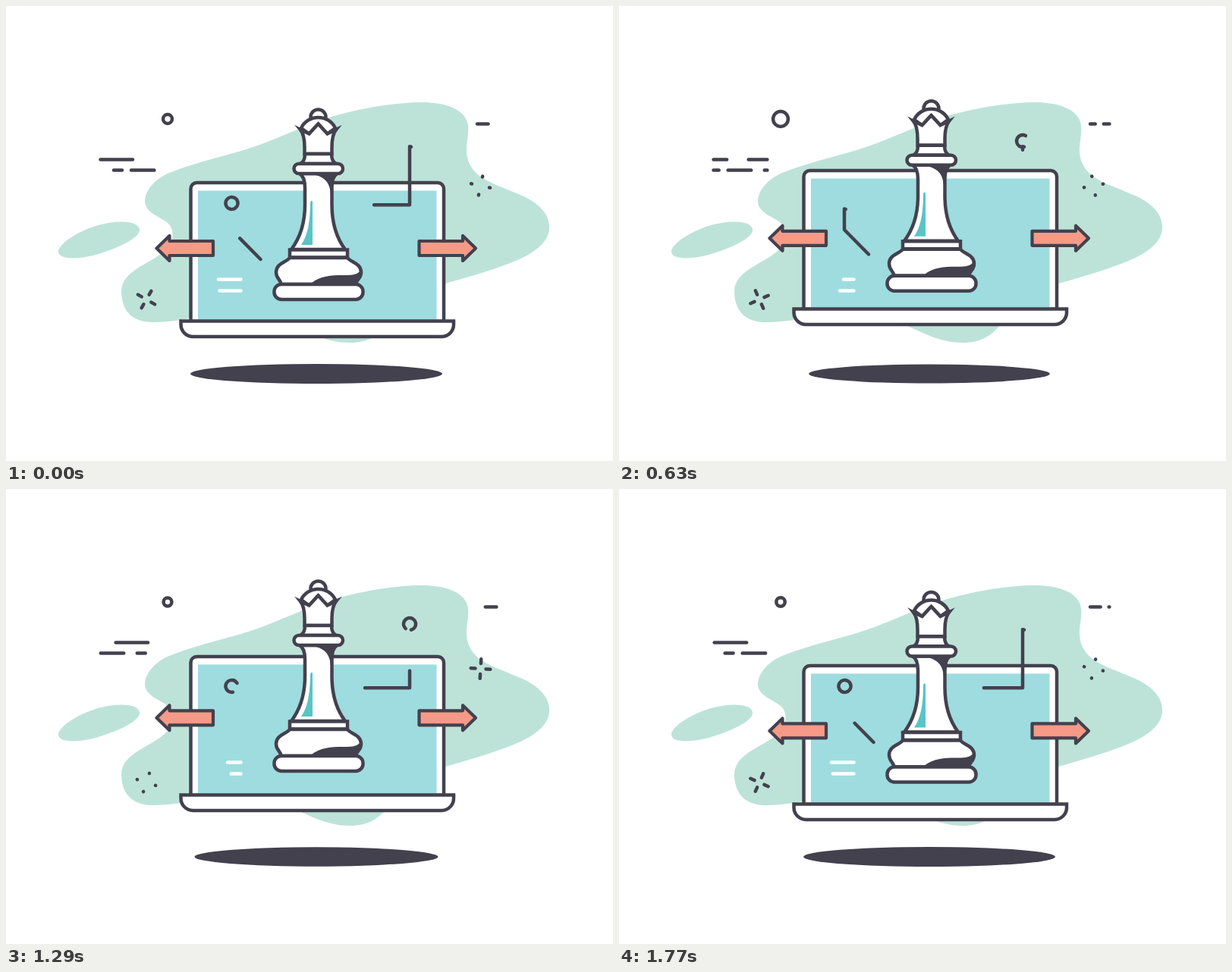
Write an HTML page that moves like this. It is 800 by 600 pixels and loops after 1800 ms.

```html
<!DOCTYPE html>
<html lang="en">
<head>
<meta charset="utf-8">
<title>Strategy</title>
<style>
  html, body { margin: 0; width: 100%; height: 100%; overflow: hidden; background: #fff; }
  svg { display: block; width: 800px; height: 600px; }
  .ink { fill: none; stroke: #43414e; stroke-width: 4.5; }
  .solid { fill: #fff; stroke: #43414e; stroke-width: 4.5; }
  .round { stroke-linecap: round; stroke-linejoin: round; }
  .flat { stroke: none; }
  .dark { fill: #43414e; }
  .mint { fill: #bde3d8; }
  .teal { fill: #5ac4c6; }
  .coral { fill: #f59a87; stroke: #43414e; stroke-width: 4.2; stroke-linejoin: round; }
  .white { stroke: #fff; }
</style>
</head>
<body>
<svg viewBox="0 0 800 600">
  <g class="mint">
    <path d="M152 378C153 402 166 417 194 417C230 417 246 409 290 406C330 404 352 411 380 422C405 433 425 444 453 444C478 444 493 434 504 418C520 394 545 376 579 366C625 353 665 341 690 327C708 316 717 304 716 290C715 272 700 259 680 250C655 239 638 234 624 224C611 214 606 200 607 186C608 175 610 167 609 157C605 134 575 126 543 127C505 128 456 137 420 149C385 161 345 181 310 191C270 202 237 211 215 220C195 229 183 244 183 258C184 274 205 278 214 287C223 296 220 312 212 320C194 340 151 347 152 378Z"/>
    <path d="M69 323C71 312 96 297 118 290C143 282 173 282 176 294C178 305 150 318 125 326C100 334 68 336 69 323Z"/>
  </g>
  <ellipse id="shade" class="dark" cx="409" cy="485"/>

  <g id="laptop">
    <path class="solid" d="M243.5 416V241a8 8 0 0 1 8-8H569a8 8 0 0 1 8 8V416Z"/>
    <path fill="#9edcdf" d="M253 243.5H567.5V415H253Z"/>
    <path class="solid" d="M230.5 415.5H590V420a16 16 0 0 1-16 16H246.5a16 16 0 0 1-16-16Z"/>
  </g>

  <g class="ink round">
    <circle id="ring" cx="213" cy="149"/>
    <path id="dashA" d="M124.5 202.5H195.4"/>
    <path id="dashB" d="M124.5 216.5H195.4"/>
    <path id="dashC" d="M621 155.5H646.4"/>
    <path id="wireL" pathLength="136" d="M335.5 334L297 295V267.5L299 267.9a8 8 0 0 1-3-15.8a8 8 0 0 1 3 15.8"/>
    <path id="wireR" pathLength="188" d="M473 262.3H532V185.3L534 185.8a8 8 0 0 1-4-15.5a8 8 0 0 1 4 15.5"/>
    <path id="sparkL"/>
    <path id="sparkR"/>
    <path id="noteA" class="white"/>
    <path id="noteB" class="white"/>
  </g>

  <g id="arrows" class="coral">
    <path id="arrow" d="M198.5 319.5L215.5 303V310H273V329H215.5V336Z"/>
    <use href="#arrow" transform="matrix(-1 0 0 1 817.5 0)"/>
  </g>

  <g id="queen" class="solid" stroke-linejoin="round">
    <circle cx="411.5" cy="146.5" r="10"/>
    <path d="M389 161A25 25 0 0 1 434 161L423.5 168.5L411.5 155.5L399.5 168.5Z"/>
    <path stroke-linejoin="miter" stroke-miterlimit="10" d="M388 163L399.5 168.5L411.5 155.5L423.5 168.5L435 163C431 168 429.5 178 429.5 186V195H393.5V186C393.5 178 392 168 388 163Z"/>
    <path d="M394 195C394 201 392 206 388 208H435C431 206 429 201 429 195Z"/>
    <path d="M387 221C392 224 394 231 394 240V262C394 285 388 305 376 321H447C435 305 429.5 285 429.5 262V240C429.5 231 431 224 436 221Z"/>
    <path class="flat dark" d="M402 222H438C432 227 430 234 430 248H428C427 233 420 224 402 222Z"/>
    <path class="flat teal" d="M404 257.5C402 256.5 401 257 401 262C400.5 285 398 302 389 315H404Z"/>
    <rect x="379.5" y="208" width="64.5" height="13" rx="6.5"/>
    <path stroke-linejoin="miter" d="M374 321.5H450V331.5H374Z"/>
    <path d="M374 332C370 338 356 339 356 351C356 360 362 360 362.5 367H461C462 360 468 360 468 351C468 339 454 338 450 332Z"/>
    <path class="flat dark" d="M402 366C415 354 435 355 450 355C460 355 466 352 468 347V354L461 367H402Z"/>
    <rect x="353.5" y="367" width="117" height="20" rx="9.5"/>
  </g>
</svg>
<script>
const LOOP = 1800, STEP = 30;
const el = {};
document.querySelectorAll("[id]").forEach(n => el[n.id] = n);

const set = (id, attrs) => {
  for (const k in attrs) el[id].setAttribute(k, attrs[k]);
};
const clamp = (v, lo = 0, hi = 1) => Math.min(hi, Math.max(lo, v));
const smooth = u => u * u * (3 - 2 * u);

// Smooth 0 - 1 - 0 swing
const wave = (t, delay = 0, period = LOOP) =>
  (1 - Math.cos(2 * Math.PI * (t - delay) / period)) / 2;
const sineEase = u => wave(clamp(u), 0, 2);

const lift = (id, y) => set(id, { transform: `translate(0 ${y})` });
const dashes = (id, pattern, start) =>
  set(id, { "stroke-dasharray": pattern, "stroke-dashoffset": -start });

// Distance gone along a wire; each run covers `len` once per loop
function travel(runs, t) {
  let sum = 0;
  for (const { start, time, len } of runs)
    for (let lap = 0; lap < 3; lap++)
      sum += len * clamp((t + lap * LOOP - start) / time) ** 1.2;
  return sum;
}

// The tail follows the head half a loop later
function wire(id, total, origin, runs, t) {
  const tail = travel(runs, t - LOOP / 2);
  const shown = travel(runs, t) - tail;
  dashes(id, `${shown} ${total - shown}`, (origin + tail) % total);
}

function spark(id, x, y, degrees, burst) {
  const outer = 12.8, inner = outer - clamp(9 * burst - 1.2, 0.2, 5.8);
  let d = "";
  for (let i = 0; i < 4; i++) {
    const a = (degrees + 90 * i) * Math.PI / 180;
    const point = r => `${x + r * Math.sin(a)} ${y - r * Math.cos(a)}`;
    d += `M${point(outer)}L${point(inner)}`;
  }
  set(id, { d });
}

const note = (id, y, s) => set(id, { d: `M${280 + 20 * s} ${y}H309.5` });

const runsL = [{ start: 855, time: 1330, len: 136 }];
const runsR = [{ start: 280, time: 520, len: 50 }, { start: 800, time: 760, len: 138 }];

function draw(t) {
  const s = wave(t), late = wave(t, 120), turn = t / LOOP;

  lift("laptop", -20 * s);
  lift("queen", 0.86 - 20 * late);
  lift("arrows", 1 - 23.5 * late);
  set("shade", { rx: 166 - 9 * s, ry: 13 - 0.6 * s });
  set("ring", { r: 5.2 + 4.7 * smooth(wave(t, -300)) });

  dashes("dashA", "42.5 28.5", -71 * turn);
  dashes("dashB", "11 12 30.5 17.5", 17.5 + 142 * turn);
  dashes("dashC", "15 11", 52 * turn - 0.5);

  note("noteA", 360.5, s);
  note("noteB", 375.5, wave(t, 150));

  wire("wireL", 136, 85, runsL, t);
  wire("wireR", 188, 138, runsR, t);

  spark("sparkL", 185, 387, 30 + 360 * turn, wave(t, 300, 900));
  spark("sparkR", 625.5, 237, 12 + 180 * sineEase(t / 1500), wave(t, 750, 900));
}

const begin = performance.now();
function tick() {
  const t = (performance.now() - begin) % LOOP;
  draw(Math.floor(t / STEP) * STEP);
  requestAnimationFrame(tick);
}
tick();
</script>
</body>
</html>
```
